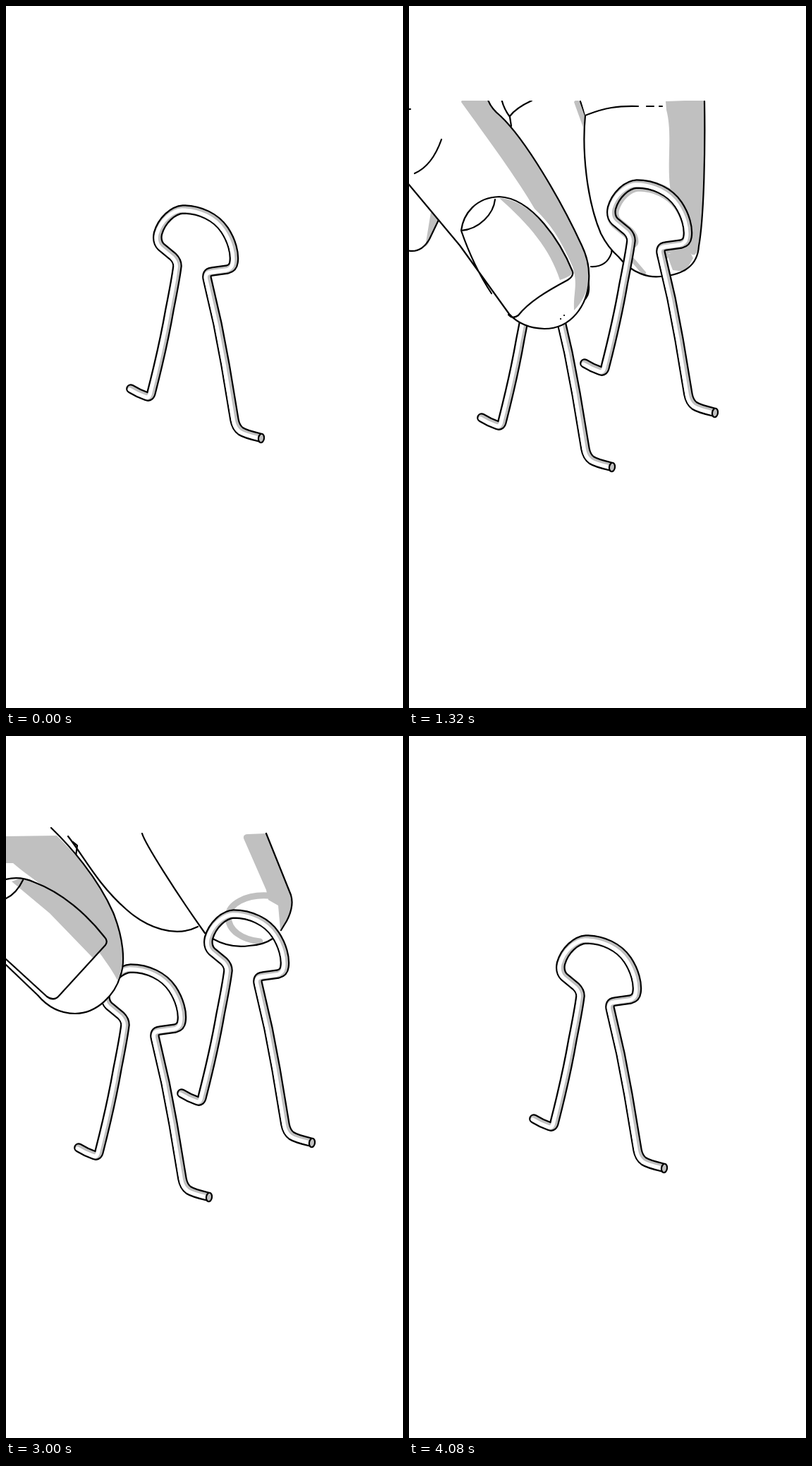
An HTML page that plays this animation: 563 by 994 pixels, repeating every 5.4 s.

```html
<!DOCTYPE html>
<html lang="en">
<head>
<meta charset="utf-8">
<title>Wire handles</title>
<style>
html, body { margin: 0; width: 100%; height: 100%; overflow: hidden; background: #fff; }
svg { display: block; width: 100%; height: 100%; }
path, ellipse { stroke-linecap: round; stroke-linejoin: round; }
.line { fill: none; stroke: #000; stroke-width: 2.2; }
.white { fill: #fff; }
.gray { fill: #c0c0c0; }
.shade { fill: none; stroke: #c0c0c0; }
</style>
</head>
<body>
<svg id="stage" viewBox="0 0 563 994"></svg>
<script>
const LOOP = 'M243 368Q243 361 237 355L220 341Q213 334 215.500 322C221 303 237 289 251 288' +
  'C275 288 298 299 310 317C320 332 325 350 323 363Q322 371 314 373L292 376Q283 377 285.500 387';
const WIRE = 'M177 542L188 548L199 552.500Q205 555 206.500 546C217 505 226 465 232 430Q241 385 243 368' +
  LOOP.slice(8) + 'L300 450L311 508L324 586Q326 597 333 602Q339 606 360 611';

const line = d => `<path class="line" d="${d}"/>`;
const white = d => `<path class="white" d="${d}"/>`;
const gray = d => `<path class="gray" d="${d}"/>`;
const shade = (d, w) => `<path class="shade" stroke-width="${w}" d="${d}"/>`;
const move = (x, y, body) => `<g transform="translate(${x} ${y})">${body}</g>`;
const stroke = (color, w) =>
  `<path d="${WIRE}" fill="none" stroke="${color}" stroke-width="${w}"/>`;

const clip = stroke('#000', 13.6) + stroke('#c0c0c0', 9.2) +
  move(-1.7, 1, stroke('#fff', 5.4)) +
  '<ellipse class="gray" cx="362" cy="612" rx="4" ry="6.3" stroke="#000" stroke-width="2.2" transform="rotate(8 362 612)"/>';

// Each pose: back fingers, index finger body, its details, thumb, loop shadow width and shift.
const reach = {
  back: line('M88 142C110 170 130 210 170 245C200 272 240 286 272 270M95 150L101 155L99 170'),
  body: 'M193 138C205 165 240 220 282 279Q318 302 345 297Q365 296 378 287L390 275L398 262Q410 244 404 225L369 138Z',
  finger: gray('M337 145Q336 139 343 139L369 138L404 225Q409 241 398 262L389 274L386 240L372 232L369 218Z') +
    shade('M372 226C340 224 316 238 315 255C315 276 335 288 360 291', 9) +
    line('M193 138C197 152 240 220 282 279M293 287Q318 301 345 297Q365 296 378 287M369 138L404 225Q409 241 398 262L390 275'),
  thumb: white('M0 130H64C90 155 130 200 152 250C166 285 170 320 162 340C155 365 130 393 98 393Q67 393 45 367L0 324Z') +
    gray('M0 142L72 141C100 170 135 205 152 250C166 285 170 320 158 346C150 330 138 315 130 303L122 268C100 240 55 218 10 180H0Z') +
    gray('M8 206L22 201C75 214 115 250 140 285Q145 290 141 296L123 314L62 251Z') +
    line('M64 130C90 155 130 200 152 250C166 285 170 320 162 340C155 365 130 393 98 393Q67 393 45 367L0 324' +
      'M0 203Q20 198 40 207C80 222 115 253 140 285Q145 290 141 296L75 368Q68 376 58 369L0 316M24 204Q15 223 0 230'),
  shadow: null
};

const hold = {
  back: gray('M34 297L45 308L30 342L26 346Z') +
    gray('M237 141Q240 136 245 140L253 160L250 177Z') +
    line('M-30 345Q-10 353 0 351Q20 356 32 335L45 308M134 136Q137 150 146 162L148 175M146 161Q155 149 177 139' +
      'M246 140L253 160M261 374Q283 375 290 355L291 347'),
  body: 'M253 160C248 210 255 280 275 327Q285 347 300 360C320 385 345 390 360 388C390 386 412 375 414 345C422 300 423 200 422 138H247Z',
  finger: gray('M367 140L421 138C423 200 422 300 414 345Q409 366 400 352L394 306L376 278C366 235 378 190 368 152Z') +
    gray('M369 357L398 346L406 362L395 381L377 379Z') +
    shade('M318 362L336 383', 6) +
    line('M253 160C248 210 255 280 275 327Q285 347 300 360C320 385 345 390 360 388C390 386 412 375 414 345C422 300 423 200 422 140' +
      'M253 160C280 149 300 146 328 147M340 147H350M358 147H362'),
  thumb: white('M-60 100H110L116 136Q122 152 135 162C170 195 220 280 250 345Q262 370 260 395C258 430 235 463 197 463Q165 462 147 442L77 345L0 253L-60 180Z') +
    gray('M79 142Q80 137 86 139L116 138Q122 152 135 162C170 195 220 280 250 345Q262 370 260 395Q256 420 239 437C238 410 245 400 237 375C215 325 200 310 183 293C155 245 110 185 79 142Z') +
    gray('M133 278C180 280 220 340 237 382Q237 388 219 394C205 350 175 315 133 278Z') +
    line('M116 136Q120 150 135 162C170 195 220 280 250 345Q262 370 260 395C258 430 235 463 197 463Q165 462 147 442L77 345L0 253L-50 192' +
      'M79 324C82 300 100 277 133 276C180 278 220 340 237 382Q239 388 230 394C200 410 175 425 160 444Q152 450 146 443' +
      'M79 324C88 350 100 380 122 413M79 324C105 322 125 300 127 280M13 243Q38 232 51 195M0 155Q3 152 7 152M220 449h.1M225 444h.1'),
  shadow: [17, 2, 2]
};

const pinch = {
  back: gray('M66 322L71 332L52 349Z') +
    gray('M141 140Q146 136 150 139L158 158L161 190Q148 172 141 165Z') +
    gray('M247 141Q248 136 260 137L266 157L260 182Z') +
    line('M0 370Q18 378 35 365Q55 350 70 331M147 138L158 158L161 190M158 158Q165 145 180 138' +
      'M260 136L266 157M262 370Q278 372 290 355M262 370Q266 385 262 410'),
  body: 'M266 156C250 205 258 270 273 320Q285 365 310 375C335 392 365 395 390 380Q402 372 404 350C415 300 432 200 430 139H262Z',
  finger: gray('M372 152Q373 139 385 139L430 139C432 200 415 300 404 350Q402 364 398 372L394 345L390 290L369 250C364 210 374 185 372 152Z') +
    shade('M314 345L313 370M366 356L365 385', 5) +
    line('M266 156C250 205 258 270 273 320Q285 365 310 375C335 392 365 395 390 380Q402 372 404 350C415 300 432 200 430 139' +
      'M266 156Q305 142 357 149M366 150L379 153M389 154L391 155'),
  thumb: white('M0 130H118L125 142C132 155 145 175 160 190C200 225 245 300 257 350C265 385 262 415 240 443C225 460 205 463 195 462Q175 460 158 452L85 345C60 310 30 280 0 247Z') +
    gray('M86 142Q88 137 110 138L125 142C132 155 145 175 160 190C200 225 245 300 257 350C265 385 262 410 248 432C248 410 252 395 246 370C234 325 208 290 178 265C145 240 110 185 86 142Z') +
    gray('M132 286C180 290 215 340 235 392L233 402C220 355 185 304 132 286Z') +
    line('M125 142C132 155 145 175 160 190C200 225 245 300 257 350C265 385 262 415 240 443C225 460 205 463 195 462Q175 460 158 452L85 345C60 310 30 280 0 247' +
      'M89 328C92 300 110 285 132 285C180 288 215 340 235 392Q237 400 228 407C200 425 180 435 162 453L168 454' +
      'M89 328Q95 350 120 394M91 331C115 330 127 310 128 288M0 193Q8 168 19 168M20 256Q44 252 46 217'),
  shadow: [22, 2, 0]
};

// start ms, spread, pose, thumb shift, finger shift, squeeze
const steps = [
  [0, 0],
  [120, .25],
  [240, .5],
  [360, .75],
  [480, 1],
  [840, 1, reach, [-100, -170], [-62, -112], 0],
  [960, 1, reach, [-50, -95], [-32, -55], 0],
  [1080, 1, reach, [0, 0], [0, 0], 0],
  [1200, 1, hold, [-45, -35], [-8, -40], 0],
  [1320, 1, hold, [-5, -6], [-3, -5], 0],
  [1440, 1, hold, [0, 0], [0, 0], .56],
  [1560, 1, pinch, [0, 0], [0, 0], 1]
];
// Letting go replays the same steps backwards.
for (let i = 0; i < 7; i++) steps.push([2640 + 120 * i, ...steps[10 - i].slice(1)]);
for (let i = 0; i < 4; i++) steps.push([3720 + 120 * i, ...steps[3 - i].slice(1)]);

function scene([, spread, pose, thumb, finger, squeeze = 0]) {
  const left = [-74 * spread + 9 * squeeze, 41 * spread - 6 * squeeze];
  const right = [72 * spread - 7 * squeeze, -36 * spread + 7 * squeeze];
  const clips = (spread ? move(...right, clip) : '') + move(...left, clip);
  if (!pose) return clips;

  let shadow = '';
  if (pose.shadow) {
    const [w, x, y] = pose.shadow;
    shadow = `<g clip-path="url(#tip)">${move(right[0] - finger[0] + x, right[1] - finger[1] + y, shade(LOOP, w))}</g>`;
  }
  const top = pose === reach && !thumb[0] ? 129 : 134;
  const cut = body => `<g clip-path="url(#cut)">${body}</g>`;
  return `<defs><clipPath id="cut"><rect y="${top}" width="563" height="860"/></clipPath>` +
    `<clipPath id="tip"><path d="${pose.body}"/></clipPath></defs>` +
    cut(move(...finger, pose.back + white(pose.body) + shadow + pose.finger)) +
    clips + cut(move(...thumb, pose.thumb));
}

const stage = document.getElementById('stage');
const scenes = steps.map(scene);
let shown = -1;

function draw() {
  const t = performance.now() % 5400;
  let i = steps.length - 1;
  while (steps[i][0] > t) i--;
  if (i !== shown) stage.innerHTML = scenes[shown = i];
  requestAnimationFrame(draw);
}
draw();
</script>
</body>
</html>
```
